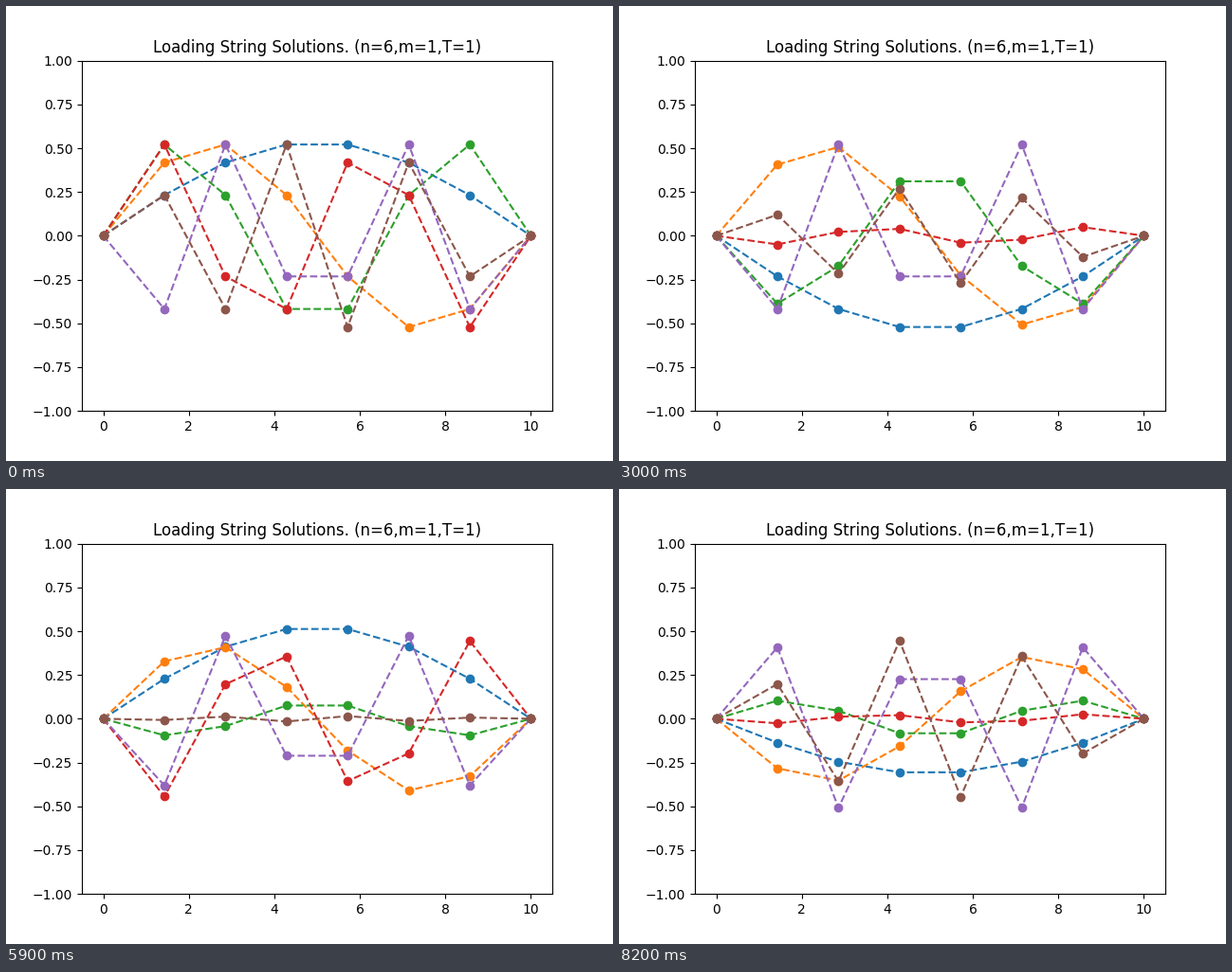
A matplotlib script that plays this animation: 640 px wide and 480 px high, repeating every 8.3 s.

```python
import numpy as np
import matplotlib.pyplot as plt
from matplotlib.animation import FuncAnimation

N, MASS, TENSION, LENGTH = 6, 1, 1, 10
FRAMES, INTERVAL, DT = 83, 100, 0.3

x = np.linspace(0, LENGTH, N + 2)
beads = np.arange(N + 2)
modes = np.arange(1, N + 1)

# Normal modes of a loaded string; the fifth one starts inverted.
shapes = np.sqrt(2 / (N + 1)) * np.sin(np.outer(modes, beads) * np.pi / (N + 1))
shapes[4] *= -1
omega = 2 * np.sqrt(TENSION * N / (MASS * LENGTH)) * np.sin(modes * np.pi / (2 * (N + 1)))

fig, ax = plt.subplots(figsize=(6.4, 4.8), dpi=100)
ax.set_title(f"Loading String Solutions. (n={N},m={MASS},T={TENSION})")
ax.set_ylim(-1, 1)
lines = [ax.plot(x, shape, "o--")[0] for shape in shapes]


def update(frame):
    swing = np.cos(omega * frame * DT)
    for line, shape, s in zip(lines, shapes, swing):
        line.set_ydata(shape * s)
    return lines


anim = FuncAnimation(fig, update, frames=FRAMES, interval=INTERVAL, repeat=True)
plt.show()
```
